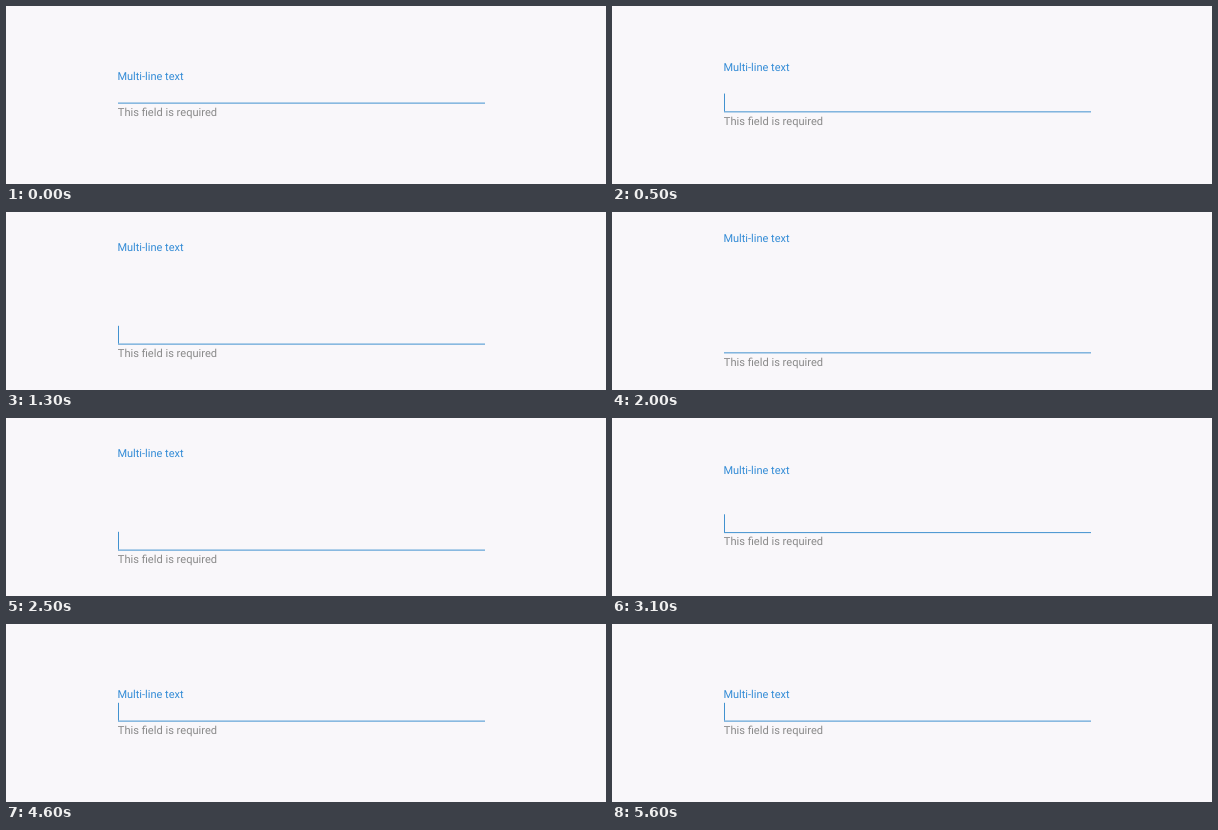
Animation of 600 by 178 pixels, one loop 5.7 s. Source, as an HTML page:

```html
<!DOCTYPE html>
<html lang="en">
<head>
<meta charset="utf-8">
<title>Multi-line text field</title>
<style>
  html, body { margin: 0; width: 100%; height: 100%; overflow: hidden; background: #f9f7fa; }
  svg { display: block; }
  text { font: 11.1px Roboto, sans-serif; text-rendering: geometricPrecision; }
  #label { font-size: 11px; fill: #348cd6; }
  #helper { fill: #8a8a8a; }
  #line, #caret { fill: #4292d0; }
</style>
</head>
<body>
<svg width="600" height="178" viewBox="0 0 600 178">
  <text id="label" x="111.4" y="73.7">Multi-line text</text>
  <g id="lower">
    <rect id="caret" x="112" y="78.8" width="1" height="17.8"/>
    <rect id="line" x="112" y="96.6" width="367" height="1"/>
    <text id="helper" x="111.8" y="109.8">This field is required</text>
  </g>
</svg>
<script>
  const LOOP = 5700;
  const TICK = 100;
  const BLINK = 500;
  const HALF_LINE = 8.75;
  const FOCUS = 100;

  // Five evenly spaced key presses, snapped to the clock tick.
  const pressKeys = first => Array.from({ length: 5 },
    (_, i) => Math.round((first + i * 274) / TICK) * TICK);
  const enters = pressKeys(400);
  const deletes = pressKeys(2505);

  const [label, lower, caret] = ["label", "lower", "caret"]
    .map(id => document.getElementById(id));

  const moveY = (element, y) =>
    element.setAttribute("transform", `translate(0 ${y})`);

  function draw(time) {
    const past = times => times.filter(t => t <= time);
    const lines = past(enters).length - past(deletes).length;
    moveY(label, -lines * HALF_LINE);
    moveY(lower, lines * HALF_LINE);

    // Every key press restarts the blinking with a visible caret.
    const lastInput = Math.max(...past([FOCUS, ...enters, ...deletes]));
    const visible = time >= FOCUS && Math.floor((time - lastInput) / BLINK) % 2 === 0;
    caret.setAttribute("opacity", visible ? 1 : 0);
  }

  const start = performance.now();
  function tick() {
    draw((performance.now() - start) % LOOP);
    requestAnimationFrame(tick);
  }
  tick();
</script>
</body>
</html>
```
